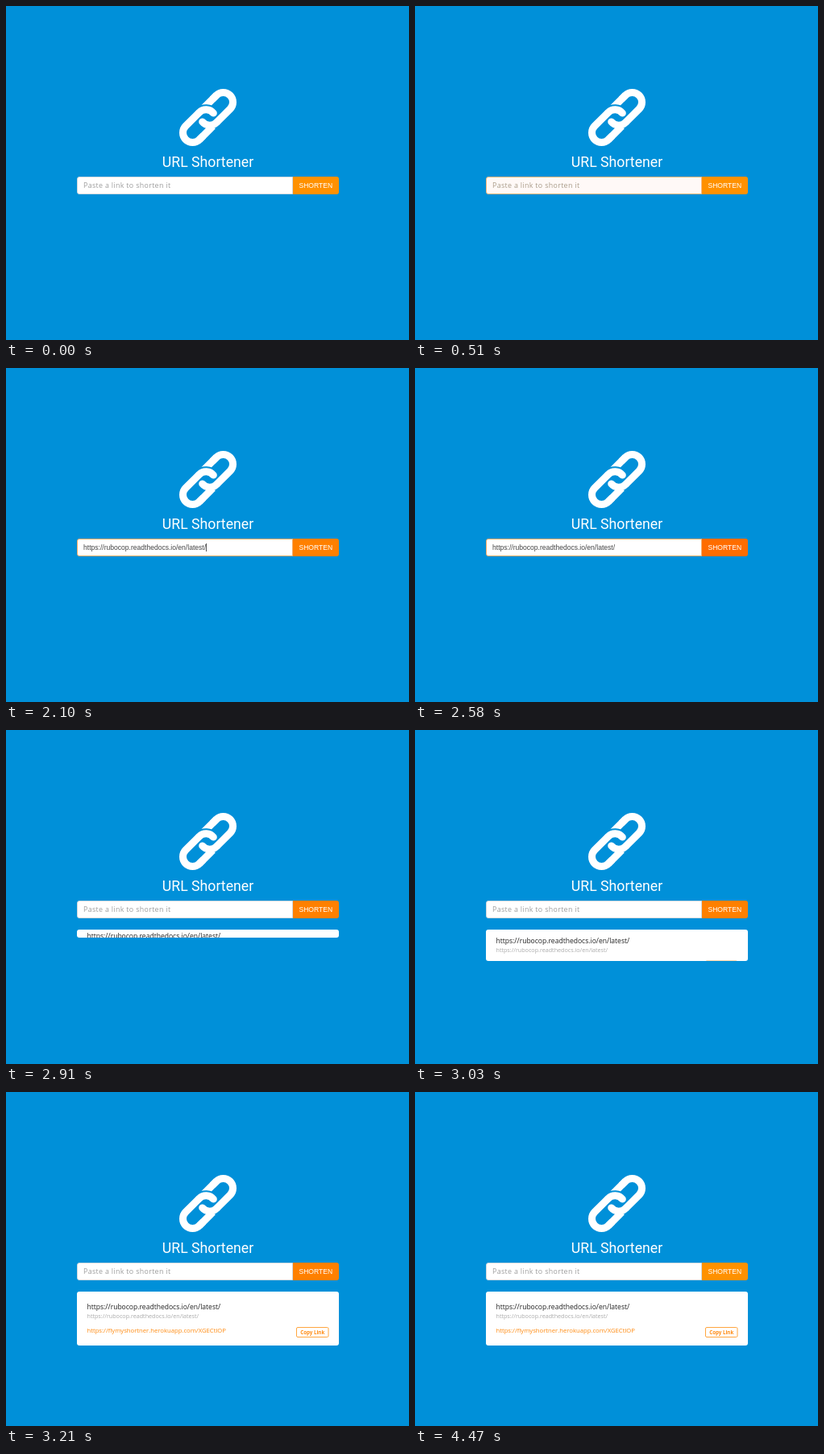
Write an HTML page that moves like this. It is 500 by 415 pixels and loops after 4.53 s.

```html
<!DOCTYPE html>
<html lang="en">
<head>
<meta charset="utf-8">
<title>URL Shortener</title>
<style>
  html, body { margin: 0; width: 100%; height: 100%; overflow: hidden; background: #0090d9; }
  svg { display: block; width: 500px; height: 415px; }
  text { font-family: "Open Sans", "Noto Sans", sans-serif; }
  .title { font: 17.7px Roboto, sans-serif; fill: #fff; text-anchor: middle; }
  .arial { font: 8.55px "Liberation Sans", Arial, sans-serif; }
  .hint { font-size: 8.9px; letter-spacing: .33px; }
  .link { fill: none; stroke: #fff; stroke-width: 9; }
  .gap { stroke: #0090d9; stroke-width: 13; }
  .round { stroke-linecap: round; }
</style>
</head>
<body>
<svg viewBox="0 0 500 415">
  <defs>
    <path id="arm" d="M3.3 -12H26.9"/>
    <path id="cap" d="M20 -12H26.9A12 12 0 0 1 26.9 12H3.3"/>
    <path id="curl" d="M3.3 12A12 12 0 0 1 -8.66 -1"/>
    <g id="under"><use href="#arm"/><use href="#curl" class="gap"/></g>
    <g id="over"><use href="#cap"/><use href="#curl" class="round"/></g>
    <clipPath id="clip"><rect id="clipBox" x="88" y="248" width="325" height="0" rx="3"/></clipPath>
  </defs>
  <rect width="500" height="415" fill="#0090d9"/>

  <g transform="translate(250.5 138.5) rotate(-45)" class="link">
    <use href="#under"/>
    <use href="#under" transform="rotate(180)"/>
    <use href="#arm" clip-path="none" visibility="hidden"/>
    <use href="#over"/>
    <use href="#over" transform="rotate(180)"/>
  </g>

  <text class="title" x="250.5" y="200">URL Shortener</text>

  <path id="button" d="M356 212H410a3 3 0 0 1 3 3V231a3 3 0 0 1 -3 3H356Z"/>
  <path id="field" d="M355.5 212.5H91a2.5 2.5 0 0 0 -2.5 2.5V231a2.5 2.5 0 0 0 2.5 2.5H355.5Z"/>
  <text id="hint" class="hint" x="96" y="226">Paste a link to shorten it</text>
  <text id="value" class="arial" x="96" y="226" fill="#444">https://rubocop.readthedocs.io/en/latest/</text>
  <rect id="caret" y="218" width="1" height="10" fill="#555"/>
  <text class="arial" x="363.5" y="226" fill="#fff">SHORTEN</text>

  <g clip-path="url(#clip)">
    <rect x="88" y="248" width="325" height="67" fill="#fff"/>
    <g id="content">
      <text x="100.5" y="270" font-size="8.56" fill="#222">https://rubocop.readthedocs.io/en/latest/</text>
      <text x="100.5" y="281.3" font-size="7.17" fill="#aaa">https://rubocop.readthedocs.io/en/latest/</text>
      <text x="100.5" y="299.3" font-size="7.7" fill="#ff8a10">https://flymyshortner.herokuapp.com/XGECtlOP</text>
      <rect x="360.5" y="292.5" width="39.5" height="12" rx="1.5" fill="#fff" stroke="#ffa640"/>
      <text x="380.3" y="300.6" font-size="6.2" font-weight="700" fill="#ff8a10" text-anchor="middle">Copy Link</text>
    </g>
  </g>
</svg>
<script>
  const LOOP = 4530;
  const PASTE = 1710, LEAVE = 2100, PRESS = 2580, CLEAR = 2790, SLIDE = 2810;
  const WHITE = [255, 255, 255], PINK = [255, 244, 240];
  const GREY = [158, 158, 158], RIM = [208, 216, 222];
  const ORANGE = [255, 145, 0], SOFT = [246, 184, 126], FOCUS = [244, 172, 104];

  const $ = id => document.getElementById(id);
  const [field, hint, value, caret, button, content, clipBox] =
    ["field", "hint", "value", "caret", "button", "content", "clipBox"].map($);

  const ramp = (t, start, span) => Math.min(1, Math.max(0, (t - start) / span));
  const within = (t, a, b) => t >= a && t < b;
  const mix = (a, b, p) => `rgb(${a.map((v, i) => Math.round(v + (b[i] - v) * p))})`;
  const show = (el, on) => el.setAttribute("visibility", on ? "visible" : "hidden");

  function rimColor(t) {
    if (t < 810) return mix(RIM, SOFT, ramp(t, 270, 240));
    if (t < PRESS) return mix(SOFT, FOCUS, ramp(t, 810, 180));
    return mix(FOCUS, RIM, ramp(t, PRESS, 150));
  }

  function buttonColor(t) {
    if (within(t, PRESS, 2670)) return "#ff6d00";
    return within(t, LEAVE, 4470) ? "#ff8000" : "#ff9100";
  }

  function draw(t) {
    const hover = t < LEAVE ? ramp(t, 270, 480) : 0;
    field.setAttribute("fill", mix(WHITE, PINK, hover));
    field.setAttribute("stroke", rimColor(t));
    hint.setAttribute("fill", mix(GREY, ORANGE, hover ** 3));
    button.setAttribute("fill", buttonColor(t));

    const filled = within(t, PASTE, CLEAR);
    show(value, filled);
    show(hint, !filled);
    show(caret, within(t, 840, 1320) || within(t, 1800, 2280));
    caret.setAttribute("x", filled ? 248 : 96.5);

    // Height and padding of the card grow together.
    const open = 0.5 - Math.cos(Math.PI * ramp(t, SLIDE, 400)) / 2;
    clipBox.setAttribute("height", 67 * open);
    content.setAttribute("transform", `translate(0 ${-13 * (1 - open)})`);
  }

  function tick() {
    draw(performance.now() % LOOP);
    requestAnimationFrame(tick);
  }
  tick();
</script>
</body>
</html>
```
